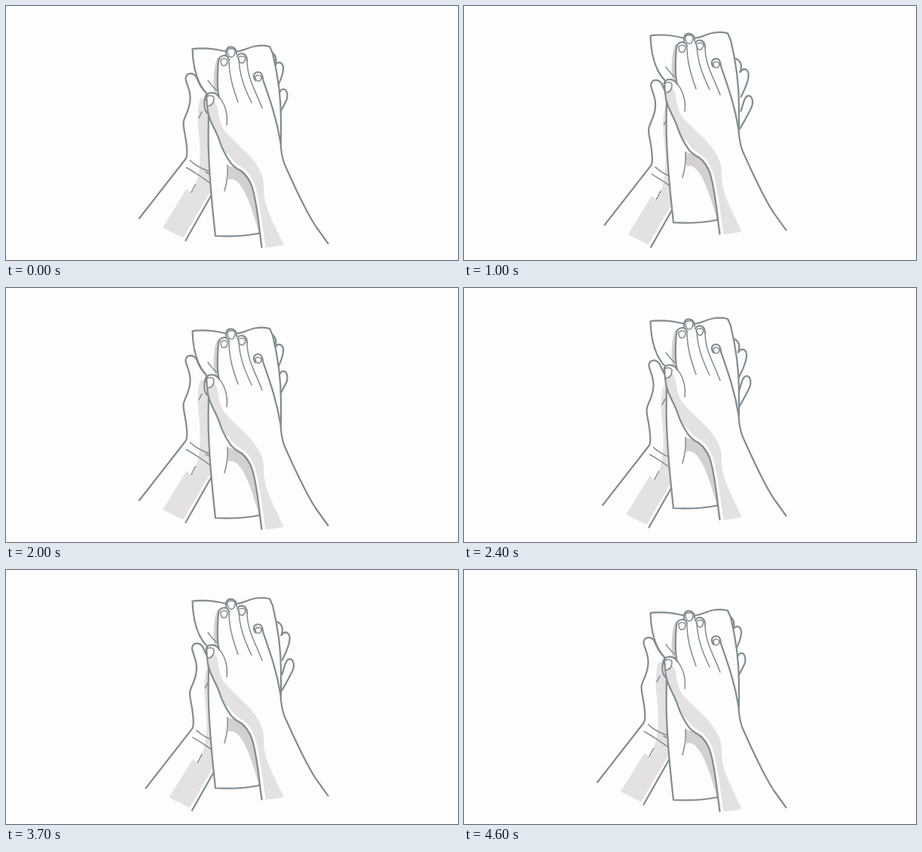
An HTML page that plays this animation: 600 by 338 pixels, repeating every 4700 ms.

```html
<!DOCTYPE html>
<html lang="en">
<head>
<meta charset="utf-8">
<title>Drying hands</title>
<style>
  html, body { margin: 0; width: 100%; height: 100%; overflow: hidden; background: #fdfdfe; }
  svg { display: block; width: 600px; height: 338px; }
  path { fill: none; stroke: #848b8e; stroke-width: 2.2; stroke-linecap: round; stroke-linejoin: round; }
  .thin { stroke-width: 1.5; }
  .skin { fill: #fdfdfe; }
  .bare { fill: #fdfdfe; stroke: none; }
  .shade { fill: #e3e1e2; stroke: none; }
  .deep { fill: #d2d0d1; stroke: none; }
  .gap { stroke: #fdfdfe; stroke-width: 3; }
</style>
</head>
<body>
<svg viewBox="0 0 600 338">
  <g id="back">
    <!-- fingertips behind the towel -->
    <path class="skin" d="M358 131C362 118 363 111 368 110.500C374 111 375 121 371 128C368 134 362 146 356 155"/>
    <path class="skin" d="M357 79C363 71 369 77 368 85C367 95 362 104 358 112"/>
    <path class="skin" d="M351 61C358 64 360 70 357 79"/>
    <!-- arm and thumb -->
    <path class="shade" d="M259 122C254 131 254 150 255.500 166C258 185 259 205 255 227L251 240C250 246 246 249 243 247C241 243 240 243 238 246L208 295L236 309L270 253L280 235L280 130L266 124Z"/>
    <path class="gap" d="M270 252L236 310"/>
    <path d="M177 282.500L238.500 203.500C242 198 240 188 239 180C238 170 234 158 236 152.500C239 143 244 137 244.500 124C245 110 238 102 238.500 95.500C240 88 249 88 253 95C257 105 260 111 267 116"/>
    <path d="M273 251L238.500 312"/>
    <path class="skin" d="M267 116C262 124 262 139 268 143"/>
    <path class="thin" d="M244.500 205.500C251 212 260 217 272 221M239.500 215C249 220 260 228 273 237M251.500 237.500L246 248M260 141L256 149M265 221L271 224"/>
  </g>
  <g id="front">
    <!-- towel -->
    <path class="skin" d="M247.500 57.300C262 55 278 57 292 60.500L306 60.500C318 60 328 49 350 54L354 63C359 84 365 115 365 150L365 182L336 302.500C318 306 297 307 278 306C274 270 270 225 269 195C268 175 269 155 269 136L267 117C252 102 248 76 247.500 57.300Z"/>
    <path class="deep" d="M282 67C276 75 275 96 276 113L286 126L284 72Z"/>
    <path class="deep" d="M294 212L295 231C303 228 308 234 313 241C322 255 328 276 336 302L340 302L334 250L314 218Z"/>
    <path class="thin" d="M268 99C272 104 275 109 281 113M294 212C295 226 293 236 290 246"/>
    <!-- hand -->
    <path class="bare" d="M339.500 321C336 300 334 262 326 239C322 229 318 224 312 219.500C305 216 300 212 297 207C291 198 287 190 284 181C279 164 268 153 267 133L265 122L272 116L281 118C279 104 281 85 282 72L289 66L293 65L293 54L305 54L306 64L318 65L320 73L330 92L340 94C350 124 359 148 365 182L369 209C385 250 400 280 411 294L427 316Z"/>
    <path class="shade" d="M276 126C283 134 281 142 283.500 151C286 160 289 165 293 169C299 176 305 181 312 188C322 197 331 207 336 217C341 226 342 232 342 240C342 255 345 266 349 275C353 286 363 305 368.500 317.500C362 320 351 321 341 321.500C336 300 334 262 326 239C322 229 318 224 312 219.500C305 216 300 212 297 207C291 198 287 190 284 181C279 164 268 153 267 133Z"/>
    <path class="gap" d="M294 198C300 208 306 213 314 217C321 222 326 231 329 239C336 262 339 297 343 321"/>
    <path d="M339.500 321C336 300 334 262 326 239C322 229 318 224 312 219.500C305 216 300 212 297 207C291 198 287 190 284 181C279 164 268 153 267 133L266 121"/>
    <path d="M340 95C350 124 359 148 364.500 182C365 193 367 203 369.500 210C383 240 396 270 411 293L427.500 316"/>
    <!-- thumb -->
    <path d="M266.500 126C262 114 276 113 281 119"/>
    <path class="thin" d="M281 119C290 128 295 143 293 158M267 121C269 118 275 119 276 122C276 128 274 133 268 133"/>
    <!-- fingers -->
    <path d="M283 122C279 107 281 86 282 73C284 64 294 64 296 71M292.500 65C289 51 307 51 306 64M307 67C310 61 320 62 320 73M331 99C326 91 331 88 335 88C339 88 340 91 341 97"/>
    <path class="thin" d="M296 72C296 93 302 111 308 128M309 70C310 94 318 112 326 129M320 72C320 96 331 112 340 136"/>
    <!-- nails -->
    <path class="thin" d="M285 72C287 69 292 69 294 72C294 77 292 79.500 289 79.500C286 79.500 285 76 285 72ZM294 58.500C296 56 302 56 304 58.500C304 65 302 68 299 68C296 68 294 64 294 58.500ZM308 69C310 66 316 66 318 69C317 74 316 76 313 76C310 76 309 73 308 69ZM331 94C333 91 337 92 339 94C339 98 337 100 335 100C332 100 331 97 331 94Z"/>
  </g>
</svg>
<script>
  const LOOP = 4700, STEP = 100, PERIOD = 2000 / 3, PEAK = 944;
  const move = (id, x, y) =>
    document.getElementById(id).setAttribute("transform", `translate(${x.toFixed(2)} ${y.toFixed(2)})`);

  // Both hands rub against each other in one sine, shown at ten poses a second
  function draw(now) {
    const t = Math.floor(now % LOOP / STEP) * STEP;
    const lift = Math.max(0, 8.8 + 10.4 * Math.cos((t - PEAK) / PERIOD * 2 * Math.PI));
    move("front", 0, -lift);
    move("back", lift * 0.54, lift * 0.5);
  }

  let start;
  function tick(now) {
    start ??= now;
    draw(now - start);
    requestAnimationFrame(tick);
  }
  draw(0);
  requestAnimationFrame(tick);
</script>
</body>
</html>
```
